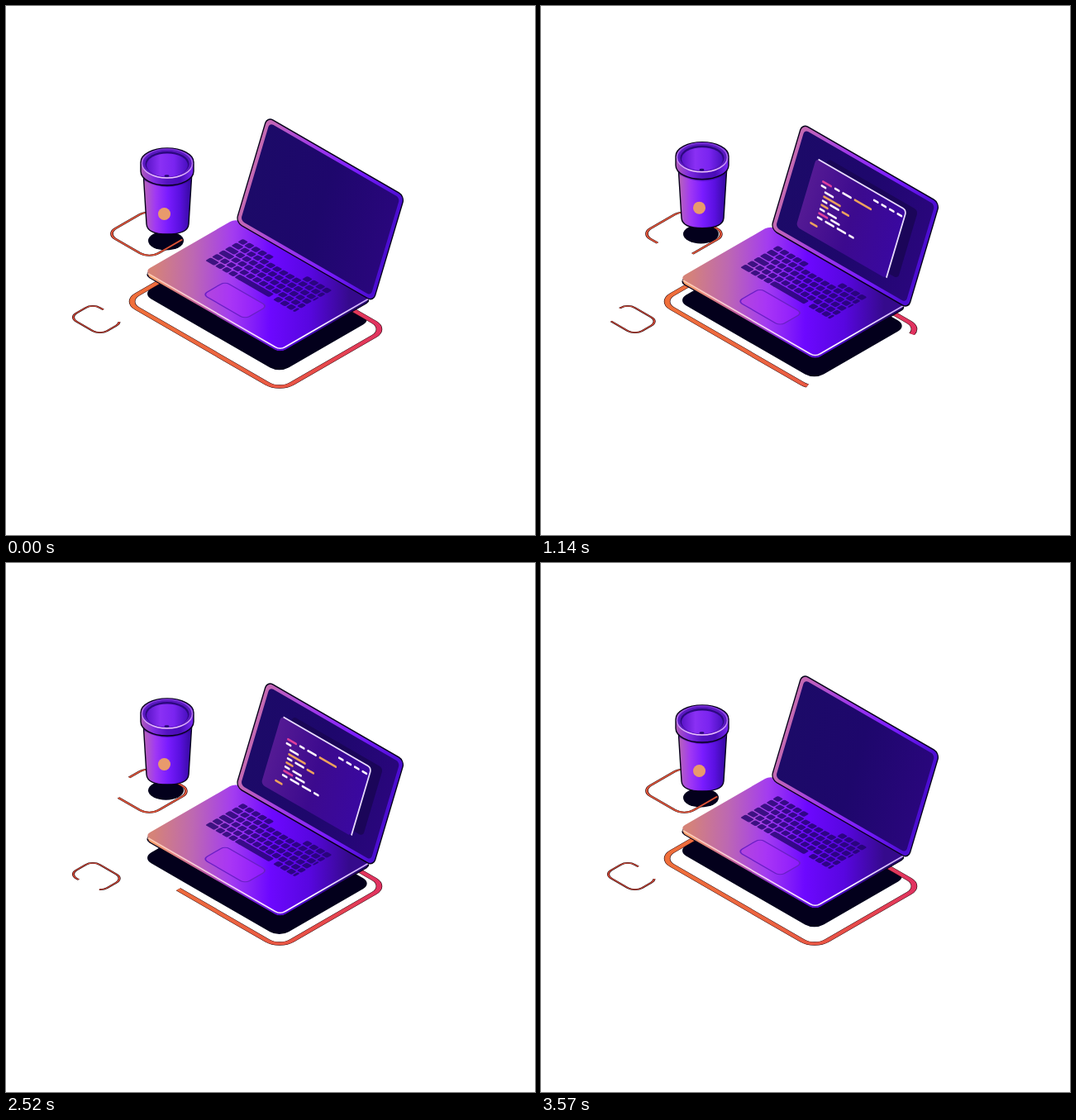
An HTML page that plays this animation: 640x640 px, repeating every 3630 ms.

```html
<!DOCTYPE html>
<html lang="en">
<head>
<meta charset="utf-8">
<title>Laptop and cup</title>
<style>
  html, body { margin: 0; width: 100%; height: 100%; overflow: hidden; background: #fff; }
  svg { display: block; width: 100vw; height: 100vh; }
</style>
</head>
<body>
<svg id="stage" viewBox="0 0 640 640"></svg>
<script>
const OUTLINE = 'stroke="#06001a" stroke-width="1.4"';
const SHADOW = 'fill="#03001c"';

// Isometric planes: flat drawings are laid on the desk or on the open lid.
const plane = (axes, x, y, content) => `<g transform="matrix(${axes} ${x} ${y})">${content}</g>`;
const onDesk = (x, y, content) => plane('.866 .5 -.866 .5', x, y, content);
const onLid = (x, y, content) => plane('.866 .5 -.285 .96', x, y, content);

const rect = (x, y, w, h, r, attrs) =>
  `<rect x="${x}" y="${y}" width="${w}" height="${h}" rx="${r}" ${attrs}/>`;
const ellipse = (cx, cy, rx, ry, attrs) =>
  `<ellipse cx="${cx}" cy="${cy}" rx="${rx}" ry="${ry}" ${attrs}/>`;

function gradient(id, [x1, y1, x2, y2], ...colors) {
  const stops = colors.map((c, i) => `<stop offset="${i / (colors.length - 1)}" stop-color="${c}"/>`);
  return `<linearGradient id="${id}" x1="${x1}" y1="${y1}" x2="${x2}" y2="${y2}">${stops.join('')}</linearGradient>`;
}

// Rounded outline on the desk with a running gap of a fifth of its length.
function track(id, x, y, w, h, r, width, paint) {
  const line = (color, thickness) => rect(0, 0, w, h, r,
    `pathLength="100" fill="none" stroke="${color}" stroke-width="${thickness}" stroke-dasharray="80 20"`);
  return onDesk(x, y, `<g id="${id}">${line('#2c0a10', width + 1.1)}${line(paint, width)}</g>`);
}

function keyboard() {
  const cols = 14, rows = 6, size = 9, space = 5;
  let keys = '';
  const key = (from, to, row) =>
    keys += rect(from * size + 0.7, row * size + 0.8, (to - from) * size - 1.4, size - 1.6, 1.6, '');
  for (let row = 0; row < rows; row++) {
    const stagger = row * 0.3 % 1;
    for (let col = 0; col < cols; col++) {
      const middle = col >= space && col < 2 * space;
      if (middle && (row === 0 || row === rows - 1)) continue;
      key(col && col + stagger, Math.min(cols, col + 1 + stagger), row);
    }
  }
  key(space, 2 * space, rows - 1);
  return `<g transform="translate(29 19)" fill="#21046c" opacity=".8">${keys}</g>`;
}

// Letters stand for coloured words, a space is an indent.
const WORDS = {
  p: ['#e0409c', 11], w: ['#fff4ff', 5], W: ['#fff4ff', 10.5], o: ['#eda25c', 8], O: ['#eda25c', 22]
};
const LINES = ['pwWO', 'w', ' W', ' O', ' wWo', ' o', ' wW', ' pW', ' wWWw', '', 'o'];

function codeLine(text, x, y) {
  let out = '';
  for (const letter of text) {
    if (letter === ' ') { x += 6.5; continue; }
    const [color, width] = WORDS[letter];
    out += `<path d="M${x} ${y}h${width}" stroke="${color}"/>`;
    x += width + 6;
  }
  return out;
}

const editor = `
  ${rect(14, -7, 126, 86, 5, 'fill="#180652" opacity=".8"')}
  ${rect(0, 0, 126, 86, 5, 'fill="url(#editorFill)"')}
  <path d="M3 0H121Q126 0 126 6V85" fill="none" stroke="#eadcff" stroke-width="1.8"/>
  <g stroke-width="2.700" stroke-linecap="round">
    ${codeLine('wwww', 84, 9.3)}
    ${LINES.map((text, row) => codeLine(text, 16.5, 21 + 5.2 * row)).join('')}
  </g>`;

const laptop = onDesk(278, 257, `
    ${rect(4, 4, 190, 128, 8, `fill="url(#edge)" ${OUTLINE}`)}
    ${rect(0, 0, 190, 128, 8, 'fill="url(#base)"')}
    <path d="M5 128H183Q190 128 190 121V4" fill="none" stroke="url(#shine)" stroke-width="2"/>
    ${keyboard()}
    ${rect(69, 84, 59, 31, 6, 'fill="#ae2cfc" fill-opacity=".4" stroke="#6a1fc6" stroke-width="1.5"')}`)
  + onLid(316, 134, `
    ${rect(0, 0, 192, 133, 8, `fill="url(#bezel)" ${OUTLINE}`)}
    ${rect(5, 5, 182, 123, 5, 'fill="url(#screen)"')}
    <g transform="translate(29 28.500)"><g id="editor">${editor}</g></g>`);

const cup = `
  <path d="M166 200L170 264Q171 276 195 276Q220 276 221 264L225 200Z" fill="url(#cupBody)" ${OUTLINE}/>
  <path d="M166 204Q195 226 225 204L224 211Q195 227 167 211Z" fill="#35078f" opacity=".6"/>
  <path d="M163 189A32 17 0 0 1 227 189V200A32 17 0 0 1 163 200Z" fill="url(#cupRim)" ${OUTLINE}/>
  ${ellipse(195, 190.5, 30.5, 17.5, 'fill="#5a18c0" stroke="url(#cupGlow)" stroke-width="1.5"')}
  ${ellipse(195, 191, 26.5, 15, 'fill="#2c0880"')}
  ${ellipse(195, 192.5, 25, 14, 'fill="url(#cupInside)"')}
  ${ellipse(194.5, 205.5, 3, 1.3, 'fill="#23066e"')}
  <circle cx="191.500" cy="251.500" r="7.500" fill="#e99a6c"/>`;

const ACROSS = [0, 0, 1, 0], RISING = [0, 1, 1, 0], SLANTED = [0, 0.9, 1, 0.25];
const stage = document.getElementById('stage');
stage.innerHTML = `
  <defs>
    ${gradient('base', SLANTED, '#d58378', '#bd68b2', '#a33cf0', '#6d08ff', '#5806e0', '#350a8c')}
    ${gradient('edge', SLANTED, '#f59c68', '#c05ca0', '#7a1fe0', '#4a04d0', '#25066c')}
    ${gradient('shine', RISING, '#ffc9ae', '#f3ccff', '#ffffff', '#c9a4ff')}
    ${gradient('bezel', ACROSS, '#c56bb0', '#a23ae8', '#7a1cff', '#4a0cd0')}
    ${gradient('screen', ACROSS, '#1c0a68', '#1e076c', '#29067c')}
    ${gradient('editorFill', ACROSS, '#541a94', '#3c0a8e', '#3a08a0')}
    ${gradient('cupBody', ACROSS, '#b968b4', '#a038f4', '#7a1cff', '#5a10e0', '#33099a')}
    ${gradient('cupRim', ACROSS, '#b05cb8', '#7f2be0', '#5412c0', '#4a0cb8', '#7a28f4')}
    ${gradient('cupInside', ACROSS, '#5a14c8', '#8a30f4', '#7a24f0', '#4a10c0')}
    ${gradient('cupGlow', [0, 0, 0, 1], '#7a30d8', '#b070f0', '#f0c8ff')}
    ${gradient('warm', RISING, '#f0703a', '#ec6440', '#e84c48', '#e03062')}
  </defs>
  <g id="laptopShadow">${onDesk(277, 283, rect(0, 0, 192, 130, 13, SHADOW))}</g>
  <g id="cupShadow">${ellipse(193.5, 284, 21.5, 11.5, SHADOW)}</g>
  ${track('bigTrack', 273, 283, 216, 149, 17, 5.2, 'url(#warm)')}
  ${track('midTrack', 172.5, 246, 60, 59, 13, 1.9, '#e2563a')}
  ${track('smallTrack', 105, 360, 43, 33, 10, 1.4, '#d84a36')}
  <g id="laptop">${laptop}</g>
  <g id="cup">${cup}</g>`;

const LOOP = 3630, STEP = 30, CYCLE = 3570, BOB = 1800;
const part = id => document.getElementById(id);
const clamp = v => Math.max(0, Math.min(1, v));
const shift = (id, y) => part(id).setAttribute('transform', `translate(0 ${y})`);

function moveGap(id, start) {
  for (const line of part(id).children) {
    line.setAttribute('stroke-dashoffset', -100 * (start + 0.2));
  }
}

function draw(ms) {
  const t = Math.min(Math.floor((ms % LOOP) / STEP) * STEP, CYCLE) % CYCLE;
  const turn = t / CYCLE;
  const bob = 1 - Math.abs(1 - (t % BOB) / (BOB / 2));
  shift('laptop', 11.3 * bob);
  shift('laptopShadow', 11 * bob);
  shift('cup', -10 * bob);
  shift('cupShadow', -11 * bob);

  moveGap('bigTrack', 0.972 + turn);
  moveGap('midTrack', 0.052 - 2 * turn);
  moveGap('smallTrack', 0.035 + 2 * turn);

  const scale = clamp(Math.min(t - 600, 3000 - t) / 280);
  part('editor').setAttribute('transform', `translate(63 43) scale(${scale}) translate(-63 -43)`);
}

const begin = performance.now();
function tick() {
  draw(performance.now() - begin);
  requestAnimationFrame(tick);
}
tick();
</script>
</body>
</html>
```
